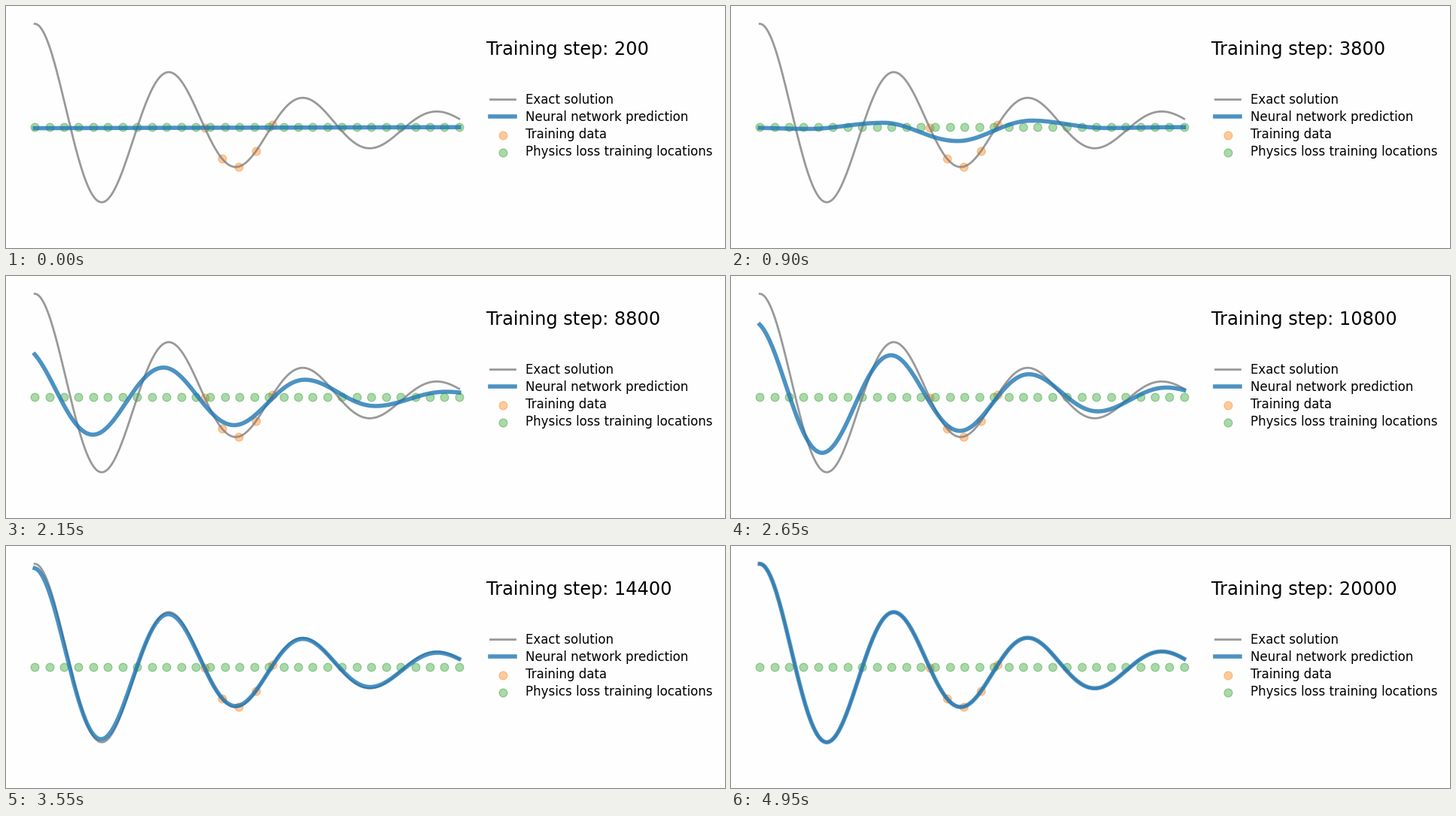
A matplotlib script for the animation above (5 s loop, 955 by 322 pixels).

```python
import numpy as np
import matplotlib.pyplot as plt
from matplotlib.animation import FuncAnimation

W, H, DPI = 955, 322, 100
FRAMES, INTERVAL = 100, 50
STEPS_PER_FRAME = 200
DAMP, W0 = 2, 20
OMEGA = np.sqrt(W0**2 - DAMP**2)
HALF = np.pi / OMEGA  # time between neighbouring extrema
K = np.arange(8)      # extrema of the oscillation

plt.rcParams["font.family"] = "DejaVu Sans"


def exact(t):
    """Underdamped oscillator released from rest at 1."""
    return np.exp(-DAMP * t) * (np.cos(OMEGA * t) + DAMP / OMEGA * np.sin(OMEGA * t))


def learned(ms, start, scale, power):
    """Share learned so far: 0 until start, then rising smoothly to 1."""
    return 1 - np.exp(-(np.maximum(ms - start, 0) / scale) ** power)


def extrema(ms):
    """Positions and values of the prediction's extrema."""
    # The data pull in the nearby extrema first; the physics loss then
    # fits the whole curve, a little later towards the right.
    data = .43 * np.exp(-(K - 3.3)**2 / 1.2) * learned(ms, 0, 750, 3)
    physics = learned(ms, 700 + 90 * np.maximum(K - 3, 0), 1720, 2.3)
    left = 1 - learned(ms, 700, 1720, 2.3)
    growth = 1 - (1 - data) * (1 - physics)
    xs = K * HALF + .017 * left * (K - 3.4)
    us = growth * exact(K * HALF) - .012 * left * (1 - K / 7)
    return xs, us


def prediction(t, ms):
    """Join the extrema with half waves shaped like the exact solution."""
    xs, us = extrema(ms)
    k = np.clip(np.searchsorted(xs, t, side="right") - 1, 0, len(xs) - 2)
    p = (t - xs[k]) / (xs[k + 1] - xs[k])
    ease = (1 - exact(HALF * p)) / (1 - exact(HALF))
    return us[k] + (us[k + 1] - us[k]) * ease


fig = plt.figure(figsize=(W / DPI, H / DPI), dpi=DPI, facecolor="#fefefe")
ax = fig.add_axes([10 / W, 10 / H, 620 / W, 302 / H])
ax.set(xlim=(-.05, 1.05), ylim=(-1.1, 1.1))
ax.axis("off")

x = np.linspace(0, 1, 500)
data_x = x[200:300:20]
physics_x = np.linspace(0, 1, 30)

ax.plot(x, exact(x), color="grey", lw=2, alpha=.8, label="Exact solution")
curve, = ax.plot(x, prediction(x, 0), color="tab:blue", lw=4, alpha=.8,
                 label="Neural network prediction")
ax.scatter(data_x, exact(data_x), s=60, color="tab:orange", alpha=.4,
           label="Training data")
ax.scatter(physics_x, 0 * physics_x, s=60, color="tab:green", alpha=.4,
           label="Physics loss training locations")
ax.legend(loc=(1.01, .338), frameon=False, fontsize="large", labelspacing=.31)
title = ax.text(1.065, .7, "", fontsize="xx-large", color="k")


def update(i):
    curve.set_ydata(prediction(x, i * INTERVAL))
    title.set_text(f"Training step: {(i + 1) * STEPS_PER_FRAME}")
    return curve, title


anim = FuncAnimation(fig, update, frames=FRAMES, interval=INTERVAL,
                     repeat=True, repeat_delay=0)
plt.show()
```
